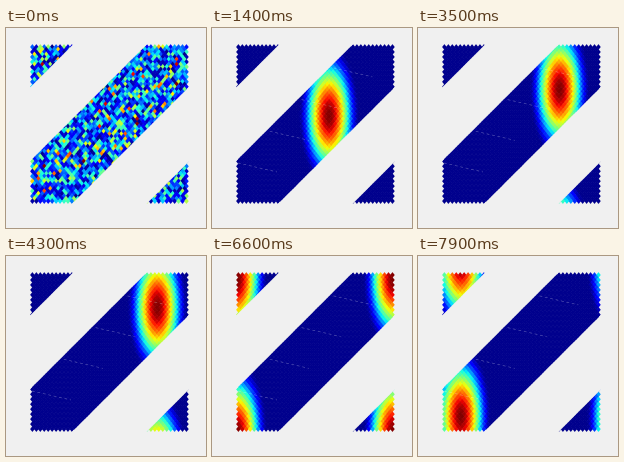
Animation of 200 by 200 pixels, one loop 8 s. Source, as a matplotlib script:

```python
import numpy as np
import matplotlib.pyplot as plt
from matplotlib.animation import FuncAnimation
from matplotlib.collections import LineCollection, PolyCollection
from matplotlib.path import Path

SIZE, STEP, FRAMES = 200, 100, 80
PERIOD = np.array([156.0, 154.0])
RADIUS = np.array([30.0, 72.0])
PITCH_X, PITCH_Y = 3.95, 4.97
# ranges of x + y that the sheet covers
BANDS = [(0, 83.5), (157.3, 241.8), (316.5, 400)]


def lattice():
    """Staggered diamond centres, with a margin around each diagonal band."""
    pts = []
    for row in range(63):
        y = 19.0 + row * PITCH_Y / 2
        for col in range(40):
            x = 26.4 + (col + 0.5 * (row % 2)) * PITCH_X
            if x < 182 and any(lo - 5 < x + y < hi + 5 for lo, hi in BANDS):
                pts.append((x, y))
    return np.array(pts)


def band_path():
    strips = [Path([(lo, 0), (hi, 0), (hi - SIZE, SIZE), (lo - SIZE, SIZE),
                    (lo, 0)], closed=True) for lo, hi in BANDS]
    return Path.make_compound_path(*strips)


def centre(t):
    tau = t - 1400
    return np.array([117 + 0.0113 * tau + 2e-7 * tau ** 2,
                     88 - 0.0125 * tau])


def bump(t, spread=1.0):
    d = cells - centre(t)
    d -= PERIOD * np.round(d / PERIOD)
    r2 = ((d / (RADIUS * spread)) ** 2).sum(axis=1)
    return np.clip(1 - r2, 0, 1) ** 2


cells = lattice()
rng = np.random.default_rng(4)
noise = np.clip(np.abs(rng.normal(0, 0.32, len(cells))), 0, 1)

fig = plt.figure(figsize=(2, 2), dpi=100, facecolor="#f0f0f0")
ax = fig.add_axes([0, 0, 1, 1])
ax.set(xlim=(0, SIZE), ylim=(SIZE, 0))
ax.axis("off")

# slightly oversized diamonds so that no gaps show between neighbours
w, h = 0.58 * PITCH_X, 0.58 * PITCH_Y
diamond = np.array([(-w, 0), (0, -h), (w, 0), (0, h)])
tiles = PolyCollection(cells[:, None, :] + diamond, cmap="jet",
                       edgecolors="none")
tiles.set_clim(-0.014, 1)
ax.add_collection(tiles)
tiles.set_clip_path(band_path(), ax.transData)

# faint dashed seams across the band
starts = [(26 + 31.8 * k, 135 - 31.7 * k) for k in range(4)]
seams = LineCollection([[(x, y), (x + 39, y + 9)] for x, y in starts],
                       colors="white", linewidths=0.4, alpha=0.38,
                       linestyles=[(0, (5, 5))])
ax.add_collection(seams)


def draw(i):
    t = i * STEP
    if t < 400:
        values = noise
    else:
        k = (t - 400) / STEP
        mix = 0.35 * np.exp(-k / 0.8)
        spread = 1 + 0.7 * np.exp(-k / 2)
        values = (1 - mix) * bump(t, spread) + mix * noise
    tiles.set_array(values)
    seams.set_visible(t >= 400)
    return tiles, seams


anim = FuncAnimation(fig, draw, frames=FRAMES, interval=STEP,
                     repeat=True, repeat_delay=0)
plt.show()
```
